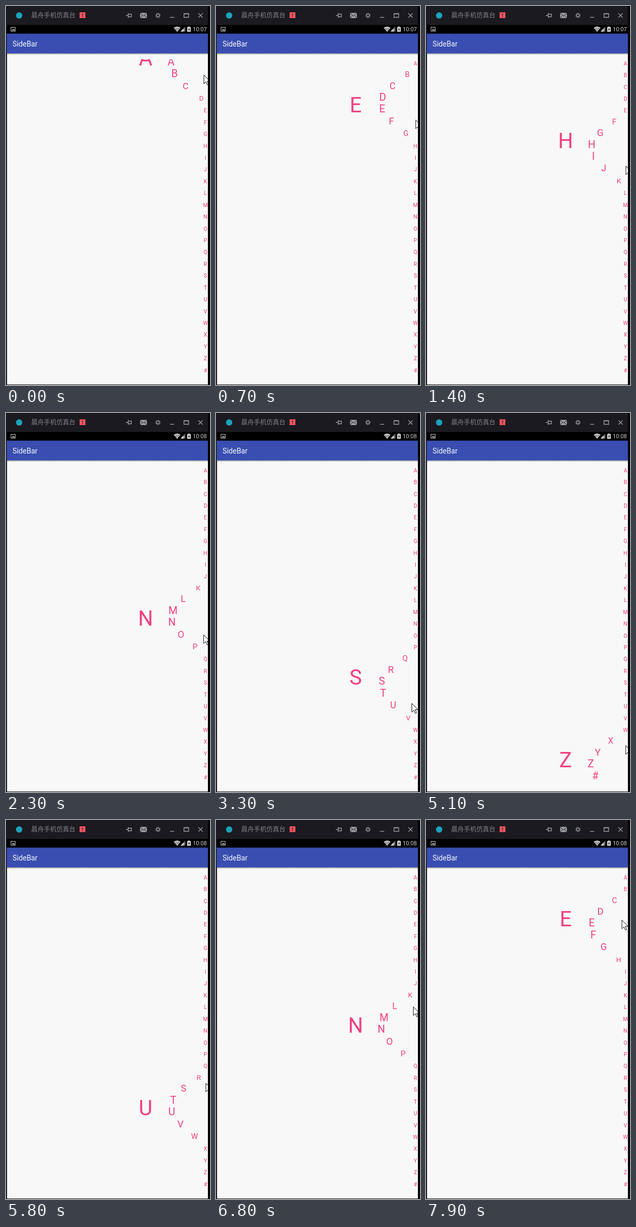
An HTML page that plays this animation: 388 px wide and 720 px high, repeating every 8000 ms.

```html
<!DOCTYPE html>
<html lang="en">
<head>
<meta charset="utf-8">
<title>SideBar</title>
<style>
  html, body { margin: 0; width: 100%; height: 100%; overflow: hidden; background: #1b1a20; }
  svg { display: block; width: 388px; height: 720px; font-family: Roboto, "Noto Sans", sans-serif; }
  .cjk { font-family: "Noto Sans CJK SC", "Noto Sans CJK", sans-serif; }
  .icons { fill: none; stroke: #9b9ca5; stroke-width: 1.3; }
</style>
</head>
<body>
<svg viewBox="0 0 388 720">
  <defs>
    <clipPath id="barClip"><rect x="2" y="101" width="382" height="618"/></clipPath>
    <clipPath id="screenClip"><rect width="384" height="719"/></clipPath>
    <linearGradient id="shade" x2="0" y2="1">
      <stop stop-color="#9c9ca2"/><stop offset="1" stop-color="#f8f8f8"/>
    </linearGradient>
  </defs>

  <rect width="388" height="720" fill="#1b1a20"/>
  <rect x="2" y="36" width="382" height="17" fill="#000"/>
  <rect x="384" width="4" height="720" fill="#040406"/>
  <rect x="1.5" y="52.5" width="382.500" height="38" fill="#394eb0"/>
  <rect x="2" y="90" width="382" height="629" fill="#f8f8f8"/>
  <rect x="2" y="90" width="382" height="3" fill="url(#shade)"/>

  <!-- window title -->
  <circle cx="25" cy="18" r="6" fill="#1ba3bd"/>
  <text class="cjk" x="48" y="22.3" font-size="12" fill="#83848b">晨舟手机仿真台</text>
  <rect x="140" y="12" width="11" height="11" fill="#f2555f"/>
  <path d="M145.5 14v4.6M145.5 19.8v1.4" stroke="#1b1a20" stroke-width="1.3"/>
  <g class="icons">
    <path d="M228 18h4M232.5 13.5v9M232.5 15.5h6v5h-6"/>
    <rect x="255" y="13" width="13" height="10" fill="#9b9ca5" stroke="none"/>
    <path d="M255 13.5l6.5 5.5 6.5-5.5M255 23l4.5-5M268 23l-4.5-5" stroke="#1b1a20" stroke-width="1"/>
    <circle cx="289" cy="18" r="2.7"/>
    <circle cx="289" cy="18" r="4.300" stroke-dasharray="1.5 1.877"/>
    <path d="M312 21.5h8"/>
    <path d="M338.5 14.5h9v7h-9zM338 15h10"/>
    <path d="M366 14l8 8M374 14l-8 8"/>
  </g>

  <!-- status bar -->
  <rect x="9.5" y="40.5" width="8" height="7.5" fill="none" stroke="#c4c4c4"/>
  <path d="M11 46.5l2-3 1.5 1.5 1-1 1.5 2.5z" fill="#c4c4c4"/>
  <path d="M319 41.5Q325.5 36.5 332 41.5L325.5 49z" fill="#d0d0d0"/>
  <path d="M321 43.5q4.5-3 9 0M323 45.7q2.5-1.6 5 0" fill="none" stroke="#222" stroke-width=".8"/>
  <path d="M341 39.5V48.5H332z" fill="#777"/>
  <path d="M338 42.5V48.5H332z" fill="#d0d0d0"/>
  <path d="M344.5 40h2v-1h3v1h2v9h-7z" fill="#d0d0d0"/>
  <path d="M348.8 41l-2.3 4h1.5l-.5 3 2.3-4h-1.5z" fill="#111"/>
  <text id="clock" x="355.3" y="48.3" font-size="10.7" fill="#cfcfcf"></text>

  <text x="12.5" y="77" font-size="13.8" fill="#f6f7fc">SideBar</text>

  <g id="bar" clip-path="url(#barClip)" fill="#f23f80" text-anchor="middle"></g>
  <g clip-path="url(#screenClip)">
    <path id="cursor" d="M0 0V16.5L3.8 13 6.5 19 9 18 6.4 12H11.5z" fill="#fff" stroke="#111"/>
  </g>
</svg>
<script>
const LOOP = 8000, STEP = 100, CLOCK_CHANGE = 1900;
const LETTERS = [..."ABCDEFGHIJKLMNOPQRSTUVWXYZ#"];
const FIRST_Y = 109, PITCH = 22.42, BASELINE = 3.7;
const IDLE_X = 379.3, IDLE_SIZE = 10.3, GROWTH = 10;
const REACH = 3, BULGE = 66.5;
const LAG = 230; // the list trails the pointer

// Finger height: a drag to the bottom, a short rest, and back up
const DRAG = [[0, 114], [230, 131], [1400, 274], [4300, 652], [4700, 690],
  [5000, 690], [5800, 549], [6030, 500], [6800, 394], [8000, 190]];

function dragY(t) {
  const next = DRAG.findIndex(([time]) => time > t);
  if (next < 0) return DRAG[DRAG.length - 1][1];
  const [t0, y0] = DRAG[next - 1], [t1, y1] = DRAG[next];
  return y0 + (y1 - y0) * (t - t0) / (t1 - t0);
}

const pointerX = t => 376.5 + 4 * Math.cos(2 * Math.PI * (t - 1100) / 4400);
const rowY = i => FIRST_Y + i * PITCH + BASELINE;
const bulge = rows => Math.max(0, 1 - (rows / REACH) ** 1.6);

const byId = id => document.getElementById(id);
const bar = byId("bar"), clock = byId("clock"), cursor = byId("cursor");

function addLetter(char) {
  const node = document.createElementNS("http://www.w3.org/2000/svg", "text");
  node.textContent = char;
  return bar.appendChild(node);
}

function place(node, x, y, size) {
  node.setAttribute("x", x);
  node.setAttribute("y", y);
  node.setAttribute("font-size", size);
}

const rows = LETTERS.map(addLetter);
const preview = addLetter("");

function render(ms) {
  const t = Math.floor(ms % LOOP / STEP) * STEP;
  const touched = (dragY(t) - FIRST_Y) / PITCH;
  rows.forEach((node, i) => {
    const pull = bulge(Math.abs(i - touched));
    place(node, IDLE_X - BULGE * pull, rowY(i), IDLE_SIZE + GROWTH * pull ** .7);
  });
  const chosen = Math.min(LETTERS.length - 1, Math.round(touched));
  preview.textContent = LETTERS[chosen];
  place(preview, 265.5, rowY(chosen), 40);
  cursor.setAttribute("transform", `translate(${pointerX(t)} ${dragY(t + LAG)})`);
  clock.textContent = t < CLOCK_CHANGE ? "10:07" : "10:08";
}

const start = performance.now();
function tick() {
  render(performance.now() - start);
  requestAnimationFrame(tick);
}
tick();
</script>
</body>
</html>
```
